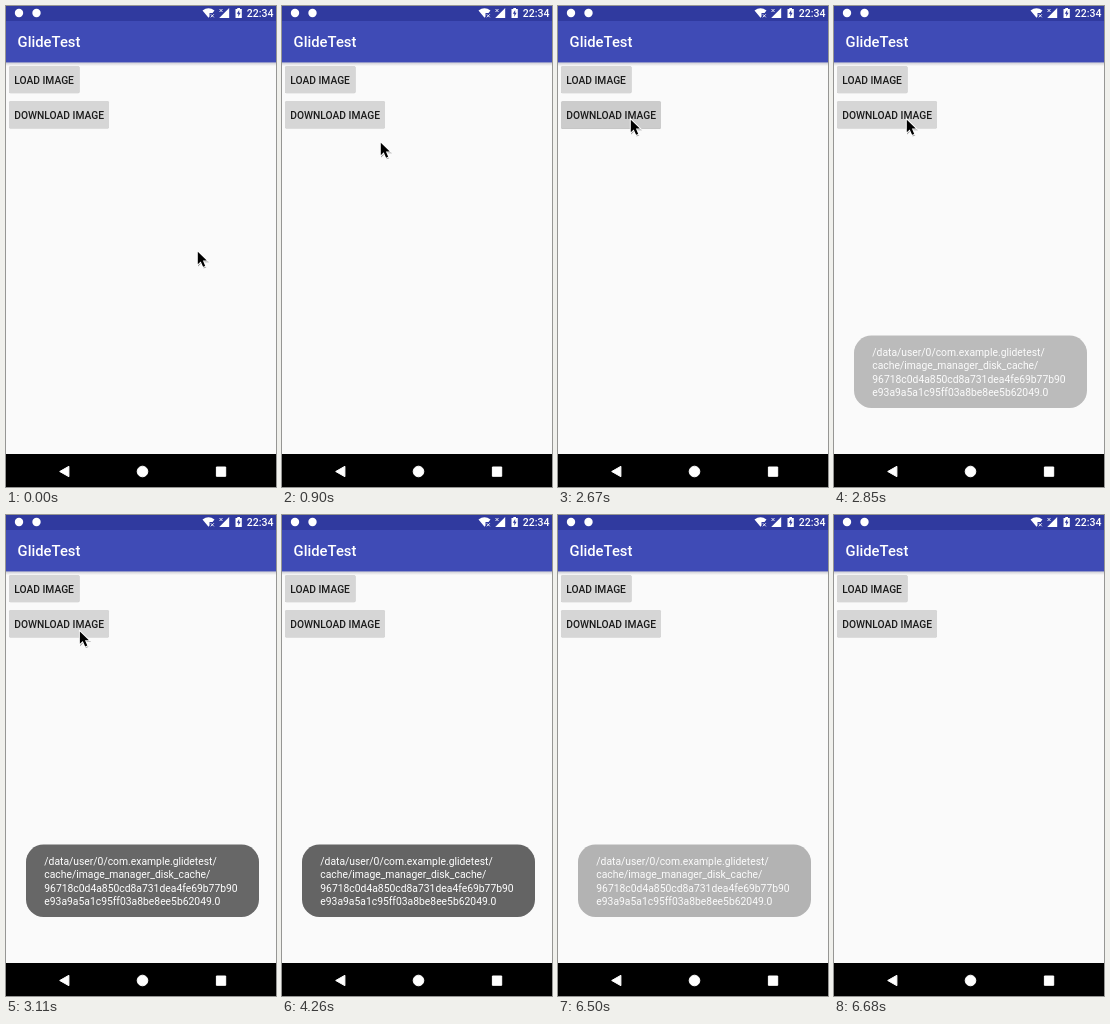
Recreate the animation shown at these times as an HTML page. Size 270 by 481 pixels, loop 8290 ms.

```html
<!DOCTYPE html>
<html lang="en">
<head>
<meta charset="utf-8">
<title>GlideTest</title>
<style>
  html, body { margin: 0; height: 100%; overflow: hidden; background: #fafafa; }
  svg { display: block; width: 100vw; height: 100vh; font-family: Roboto, sans-serif; }
  .medium { font-weight: 500; font-size: 10.5px; }
  .label { font-weight: 500; font-size: 10.25px; }
</style>
</head>
<body>
<svg viewBox="0 0 270 481" preserveAspectRatio="none">
  <defs>
    <linearGradient id="shade" x2="0" y2="1">
      <stop stop-color="#224" stop-opacity=".24"/>
      <stop offset="1" stop-color="#224" stop-opacity="0"/>
    </linearGradient>
    <clipPath id="buttonShape"><rect x="3" y="95" width="100" height="27.300" rx="1.500"/></clipPath>
    <filter id="blur" x="-20%" y="-20%" width="140%" height="160%"><feGaussianBlur stdDeviation=".7"/></filter>
  </defs>

  <rect width="270" height="481" fill="#fafafa"/>

  <!-- buttons -->
  <g filter="url(#blur)" opacity=".22">
    <rect x="3" y="60.300" width="70.500" height="27" rx="1.500"/>
    <rect id="lift" x="3" y="95.300" width="100" height="27.300" rx="1.500"/>
  </g>
  <g fill="#d6d6d6">
    <rect x="3" y="60" width="70.500" height="27" rx="1.500"/>
    <rect x="3" y="95" width="100" height="27.300" rx="1.500"/>
  </g>
  <circle id="ripple" cx="72" cy="112" clip-path="url(#buttonShape)"/>
  <g class="label" fill="#1a1a1a">
    <text x="8.200" y="77.600">LOAD IMAGE</text>
    <text x="8.200" y="112.500">DOWNLOAD IMAGE</text>
  </g>

  <!-- app bar -->
  <rect y="56" width="270" height="4" fill="url(#shade)"/>
  <rect width="270" height="56.400" fill="#3f4bb6"/>
  <rect width="270" height="15" fill="#303a9f"/>
  <text x="11.600" y="41.200" font-size="14.800" font-weight="500" fill="#fff">GlideTest</text>

  <!-- status bar -->
  <g fill="#fff">
    <circle cx="13" cy="7" r="4.200"/>
    <circle cx="30.500" cy="7" r="4.200"/>
    <path d="M196.500 4.500Q202.500 0 208.500 4.500L206.500 7H203.500V10.500L202.500 11.800Z"/>
    <path d="M223.200 2V12H213.200Z"/>
    <path d="M229.500 3H231.300V2H234V3H235.800V12H229.500Z"/>
    <text class="medium" x="240.800" y="11">22:34</text>
  </g>
  <path d="M204.800 8.300l3 3m0-3l-3 3M213.500 3l3 3m0-3l-3 3" stroke="#fff" stroke-width=".9"/>
  <path d="M233.200 4L230.800 7.800H232.300V10.800L234.600 6.800H233.200Z" fill="#303a9f"/>

  <!-- toast -->
  <g id="toast">
    <rect x="20" y="329.500" width="233" height="72.500" rx="17.500" fill="#646464"/>
    <g fill="#fff" font-size="10.350">
      <text x="38.300" y="349.700">/data/user/0/com.example.glidetest/</text>
      <text x="38.300" y="363.200">cache/image_manager_disk_cache/</text>
      <text x="38.300" y="376.800">96718c0d4a850cd8a731dea4fe69b77b90</text>
      <text x="38.300" y="390.300">e93a9a5a1c95ff03a8be8ee5b62049.0</text>
    </g>
  </g>

  <!-- navigation bar -->
  <rect y="448" width="270" height="33"/>
  <g fill="#fff" stroke="#fff" stroke-linejoin="round">
    <path d="M53.700 465.500L62.900 460.300V470.700Z"/>
    <circle cx="136.500" cy="465.500" r="5.300"/>
    <rect x="210.400" y="461" width="9.300" height="9.300"/>
  </g>

  <g id="cursor">
    <path d="M1 1.500V16.500L4.500 13.200L6.700 18.400L9.300 17.300L7.100 12.200H12Z" opacity=".4" filter="url(#blur)"/>
    <path d="M.8 1.800V14.200L3.700 11.400L6.100 16.800L8.200 15.900L5.900 10.600H9.800Z" stroke="#fff" stroke-width="1.900" paint-order="stroke"/>
  </g>
</svg>

<script>
  const LOOP = 8290, TICKS = 93, TICK = LOOP / TICKS;
  const [cursor, toast, ripple, lift] =
    ['cursor', 'toast', 'ripple', 'lift'].map(id => document.getElementById(id));

  // Pointer stops: tick, x, y
  const stops = [
    [5, 191, 244], [12, 75, 108], [15, 72, 112],
    [34.6, 72, 112], [41, 168, 348], [48, 224, 484]
  ];

  const progress = (t, from, to) => Math.min(1, Math.max(0, (t - from) / (to - from)));
  const smooth = p => p * p * (3 - 2 * p);

  function pointerAt(tick) {
    let [, x, y] = stops[0];
    for (let i = 1; i < stops.length; i++) {
      const [from, x0, y0] = stops[i - 1], [to, x1, y1] = stops[i];
      const p = smooth(progress(tick, from, to));
      x += (x1 - x0) * p;
      y += (y1 - y0) * p;
    }
    return [x, y];
  }

  function draw(ms) {
    const tick = Math.floor((ms % LOOP + 18) / TICK), t = tick * TICK;

    const [x, y] = pointerAt(tick);
    cursor.setAttribute('transform', `translate(${x} ${y})`);
    cursor.setAttribute('visibility', tick < 48 ? 'visible' : 'hidden');

    const release = progress(tick, 27, 32);
    const press = progress(tick, 22, 24) * (1 - release);
    ripple.setAttribute('r', 80 * progress(tick, 22, 26));
    ripple.setAttribute('opacity', .12 * press);
    lift.setAttribute('y', 95.3 + press);

    const fadeIn = 1 - (1 - progress(t, 2750, 3185)) ** 2;
    const fadeOut = progress(t, 6180, 6630) ** 2;
    toast.setAttribute('opacity', fadeIn * (1 - fadeOut));
  }

  const start = performance.now();
  function frame() {
    draw(performance.now() - start);
    requestAnimationFrame(frame);
  }
  frame();
</script>
</body>
</html>
```
